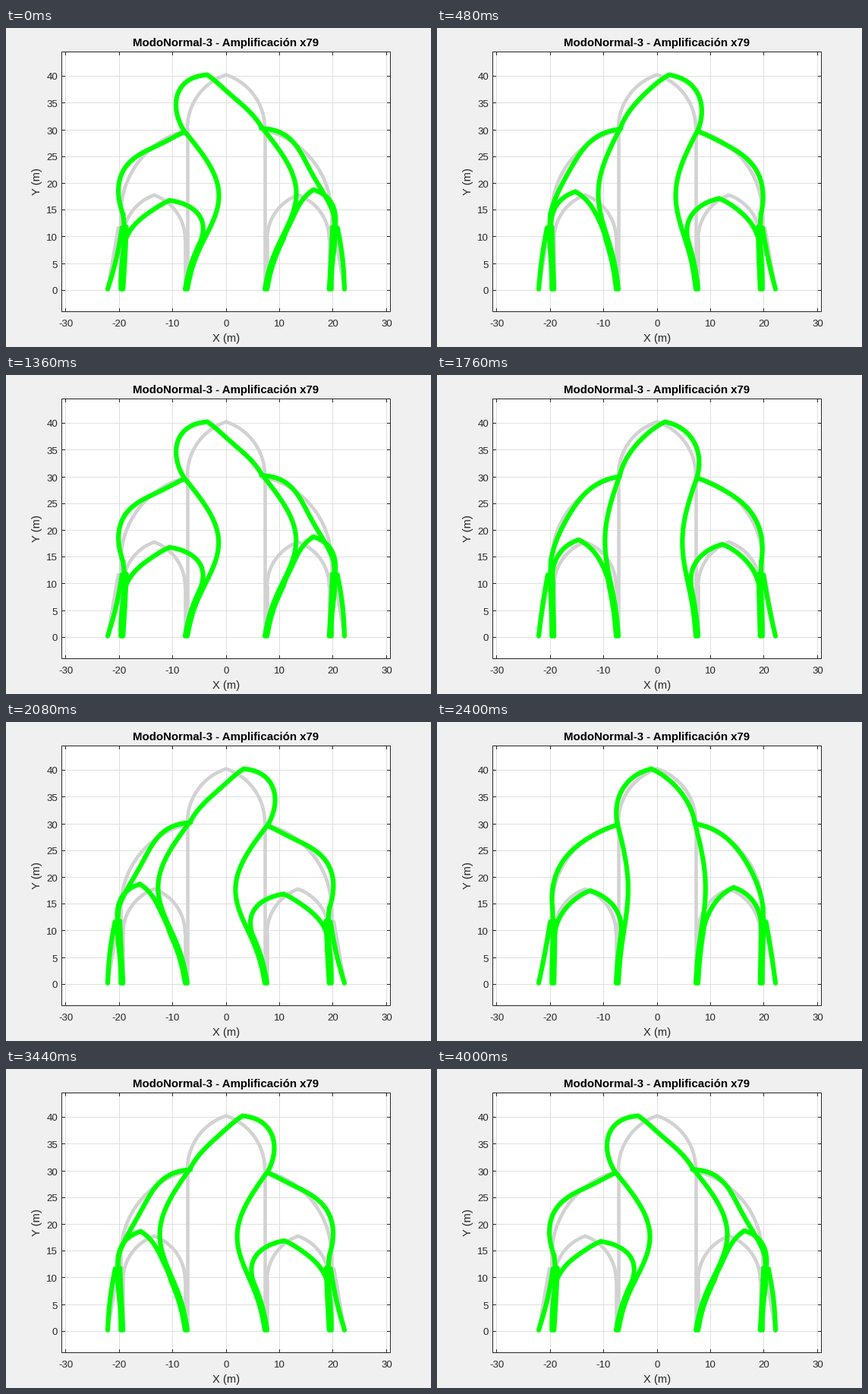
Write a matplotlib script that moves like this. It is 560x420 px and loops after 4080 ms.

```python
import numpy as np
import matplotlib.pyplot as plt
from matplotlib.animation import FuncAnimation
from matplotlib.patches import Rectangle

W, H, DPI = 560, 420, 100
PT = 72 / DPI
FRAMES, INTERVAL, CYCLES = 51, 80, 3
CX, CY, SCALE = 290, 345.2, 7.04            # data zero and pixels per metre
LEFT, RIGHT, TOP, BOTTOM = 73.5, 506.5, 31.5, 373.5
BASE = 343.8
INK, GRID, GREY, GREEN = (0.15,) * 3, (0.873,) * 3, (0.825,) * 3, (0, 1, 0)
P = np.linspace(0, 1, 80)

plt.rcParams["font.family"] = "Liberation Sans"


def bend(start, end, *waves):
    """Straight change from start to end plus sine harmonics."""
    return start + (end - start) * P + sum(
        a * np.sin(k * np.pi * P) for k, a in enumerate(waves, 1))


def post(x0, x1, top, sway, drop=0):
    """Straight member from the ground with a sideways sway."""
    pts = np.column_stack([x0 + (x1 - x0) * P, BASE + (top - BASE) * P])
    return pts, np.column_stack([sway, drop * P])


def arch(start, end, bulge, slide=0):
    """Arc rising vertically; its length is kept, so bulge sets the slide."""
    w, h = abs(end[0] - start[0]), start[1] - end[1]
    side = np.sign(end[0] - start[0])
    r = (w * w + h * h) / (2 * w)
    a = P * np.arcsin(h / r)
    s, c = np.sin(a), np.cos(a)
    steps = (bulge[1:] + bulge[:-1]) / 2 * a[1]
    along = slide - np.concatenate([[0], np.cumsum(steps)])
    pts = np.column_stack([start[0] + side * r * (1 - c), start[1] - r * s])
    disp = np.column_stack([side * (along * s - bulge * c),
                            -along * c - bulge * s])
    return pts, disp


def mirror(member):
    pts, disp = member
    return np.column_stack([2 * CX - pts[:, 0], pts[:, 1]]), disp * [1, -1]


pier_top, crown = (239, 132), (195.3, 220)
half = [
    # piers, wall and buttress
    post(239, 239, 132, bend(0, -5, 39.6, -9.65, -1.9), drop=2.5),
    post(236, 236, 278, bend(0, 21.5, -2.9)),
    post(151.3, 151.3, 245, bend(0, 3, 1.7, -1.3)),
    post(154.2, 154.2, 262, bend(0, 4.5, 0.3)),
    post(134, 148, 263, bend(0, 4.8, 2)),
    # nave, upper aisle, both sides of the lower aisle
    arch(pier_top, (CX, 61.7), bend(5, 7.7, 16.8, -0.6), slide=-2.5),
    arch((151.3, 245), (239, 134.7), bend(-3, -1.3, 9, 6, -1.2), slide=-0.5),
    arch((154.2, 278), crown, bend(-3.5, -13.4, -8.5, 1)),
    arch((236, 278), crown, bend(21.5, 0.2, 10.6, 1.5)),
]
members = half + [mirror(m) for m in half]

fig = plt.figure(figsize=(W / DPI, H / DPI), dpi=DPI, facecolor=(0.941,) * 3)
ax = fig.add_axes([0, 0, 1, 1])
ax.set_xlim(0, W)
ax.set_ylim(H, 0)
ax.axis("off")


def rule(x0, y0, x1, y1, color=INK, z=5):
    ax.plot([x0, x1], [y0, y1], color=color, lw=PT, zorder=z, snap=False,
            solid_capstyle="butt")


def box(face, edge, z):
    ax.add_patch(Rectangle((LEFT, TOP), RIGHT - LEFT, BOTTOM - TOP, fc=face,
                           ec=edge, lw=PT, zorder=z, snap=False))


def label(x, y, text, px, color=INK, **kw):
    ax.text(x, y, text, fontsize=px * PT, color=color,
            **{"ha": "center", "va": "baseline", **kw})


box("white", "none", 0)
for v in range(-30, 31, 10):
    x = np.floor(CX + v * SCALE) + 0.5
    rule(x, TOP, x, BOTTOM, GRID, 1)
    rule(x, BOTTOM, x, BOTTOM - 4.5)
    rule(x, TOP, x, TOP + 4.5)
    label(x, 393, str(v), 13.3)
for v in range(0, 41, 5):
    y = np.floor(CY - v * SCALE) + 0.5
    rule(LEFT, y, RIGHT, y, GRID, 1)
    rule(LEFT, y, LEFT + 4.5, y)
    rule(RIGHT, y, RIGHT - 4.5, y)
    label(68, y + 5, str(v), 13.3, ha="right")
box("none", INK, 5)

label(CX - 0.7, 24.4, "ModoNormal-3 - Amplificación x79", 15, "black",
      weight="bold")
label(CX, 412.6, "X (m)", 14.8)
label(48, 202.5, "Y (m)", 14.8, rotation=90, va="center", ha="right")


def draw(width, color, z):
    return [ax.plot(*pts.T, color=color, lw=width * PT, zorder=z,
                    solid_capstyle="round", solid_joinstyle="round")[0]
            for pts, _ in members]


draw(4.6, GREY, 2)
moving = draw(6.2, GREEN, 3)


def update(n):
    amp = np.cos(2 * np.pi * CYCLES * n / (FRAMES - 1))
    for line, (pts, disp) in zip(moving, members):
        line.set_data(*(pts + amp * disp).T)
    return moving


anim = FuncAnimation(fig, update, frames=FRAMES, interval=INTERVAL,
                     repeat=True, repeat_delay=0, blit=False)
plt.show()
```
